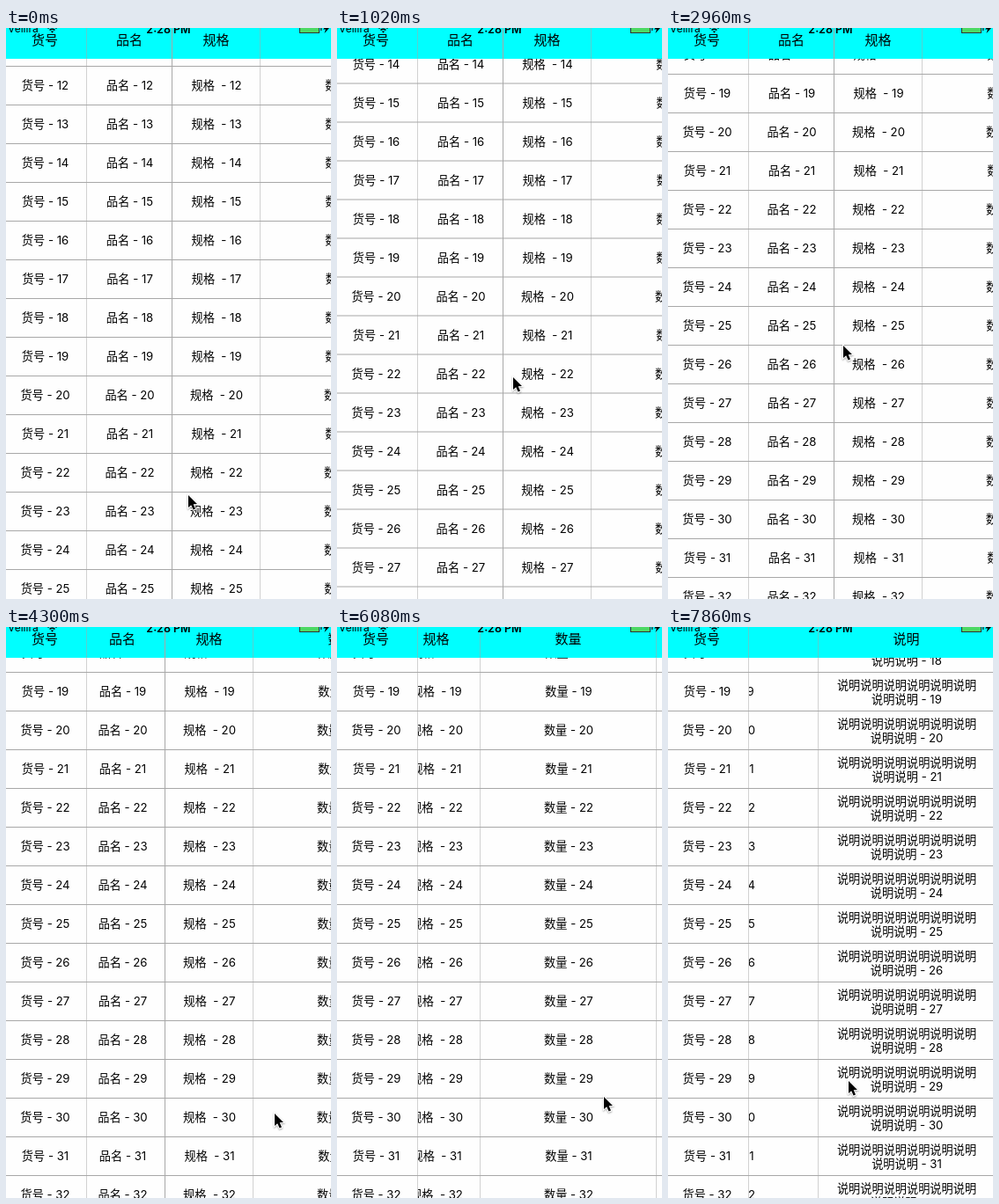
These frames come from a looping animation (369 by 649 pixels, 8 s). An HTML page with a canvas:

```html
<!DOCTYPE html>
<html lang="zh-CN">
<head>
<meta charset="utf-8">
<title>Scrolling table</title>
<style>
html, body { margin: 0; width: 100%; height: 100%; overflow: hidden; background: #fff; }
canvas { display: block; width: 369px; height: 649px; }
</style>
</head>
<body>
<canvas id="stage" width="369" height="649"></canvas>
<script>
const W = 369, H = 649, LOOP = 8000, TICK = 148.5, LAST = 53;
const HEAD = 35, ROW = 44, FROZEN = 92, FIRST = 11, END = 35;
const FONT = 'Inter, "Noto Sans CJK SC", "Noto Sans CJK", sans-serif';
const ctx = document.getElementById('stage').getContext('2d');

const columns = [
  { title: '货号', width: 95 },
  { title: '品名', width: 97, alpha: 1 },
  { title: '规格', width: 100, gap: '  ' },
  { title: '数量', width: 200 },
  { title: '说明', width: 200, long: true }
];
let left = -4;
for (const c of columns) {
  c.mid = left + c.width / 2 + 1;
  left = c.edge = left + c.width;
}
const [fixed, ...sliding] = columns;

const glide = p => p * p * (3 - 2 * p);
const settle = p => 1 - (1 - p) ** 4;

// Each move eases the pointer (x, y) and the scroll (sx, sy) to new values
const begin = { x: 207, y: 531, sx: 0, sy: 0 };
const moves = [
  { from: 0, to: 7, x: 200, y: 397, sy: 112.5 },
  { from: 7, to: 9, x: 199, y: 390, sy: 137.5, ease: settle },
  { from: 10, to: 13, y: 533 },
  { from: 15, to: 20, y: 361, sy: 299 },
  { from: 20, to: 22, y: 364, sy: 300, ease: settle },
  { from: 23, to: 26, x: 314, y: 554 },
  { from: 28, to: 34, x: 194, y: 543, sx: 111 },
  { from: 35, to: 37, x: 319, y: 535 },
  { from: 40, to: 45, x: 164, y: 522, sx: 256 },
  { from: 47, to: 49, x: 320 },
  { from: 50, to: 53, x: 205, y: 516, sx: 318 }
];

function stateAt(k) {
  const s = { ...begin };
  for (const { from, to, ease = glide, ...goal } of moves) {
    if (k <= from) break;
    const p = ease(Math.min(1, (k - from) / (to - from)));
    for (const key in goal) s[key] += (goal[key] - s[key]) * p;
  }
  return s;
}

function rect(x, y, w, h, color) {
  ctx.fillStyle = color;
  ctx.fillRect(x, y, w, h);
}

function text(str, x, y, size, align = 'center', weight = 400) {
  ctx.font = `${weight} ${size}px ${FONT}`;
  ctx.textAlign = align;
  ctx.fillStyle = '#000';
  ctx.fillText(str, x, y);
}

function clipped(x, y, w, h, paint) {
  ctx.save();
  ctx.beginPath();
  ctx.rect(x, y, w, h);
  ctx.clip();
  paint();
  ctx.restore();
}

function path(...points) {
  ctx.beginPath();
  points.forEach(([x, y]) => ctx.lineTo(x, y));
  ctx.closePath();
}

function edge(col, dx) {
  ctx.globalAlpha = col.alpha || 0.52;
  rect(col.edge - dx, 0, 1, H, '#a8a8a8');
  ctx.globalAlpha = 1;
}

const rowTop = (n, sy) => 43 + (n - 12) * ROW - sy;

function column(col, dx, sy) {
  const x = col.mid - dx;
  for (let n = FIRST; n < END; n++) {
    const y = rowTop(n, sy), tail = `${col.gap || ' '}- ${n}`;
    if (col.long) {
      text(col.title.repeat(6), x, y + 20, 13.2);
      text(col.title.repeat(2) + tail, x, y + 35.5, 13.2);
    } else {
      text(col.title + tail, x, y + 27, 13.2);
    }
  }
}

function statusBar() {
  text('Vellira', 2, 5, 12, 'left');
  text('2:28 PM', 184.5, 6, 12.5, 'center', 600);

  // Wi-Fi
  ctx.strokeStyle = '#000';
  ctx.lineWidth = 1.6;
  for (const r of [4.2, 7.2]) {
    ctx.beginPath();
    ctx.arc(52.5, 5.5, r, -Math.PI * 0.75, -Math.PI * 0.25);
    ctx.stroke();
  }
  path([50.8, 3.6], [54.2, 3.6], [52.5, 5.8]);
  ctx.fillStyle = '#000';
  ctx.fill();

  // Battery
  rect(333, -4, 23, 10, '#333');
  rect(334, -4, 21, 9, '#4cd964');
  rect(357, -1, 1.5, 4, '#333');
  path([365, -4], [360, 1.5], [363, 1.5], [361.5, 6], [367, 0], [364, 0]);
  ctx.fillStyle = '#000';
  ctx.fill();
}

function pointer(x, y) {
  ctx.save();
  ctx.translate(x, y);
  path([0, 0], [0, 14], [3.2, 11.2], [5.6, 16.6], [8, 15.6], [5.7, 10.3], [10, 10]);
  ctx.shadowColor = 'rgba(0,0,0,0.35)';
  ctx.shadowBlur = 2;
  ctx.shadowOffsetY = 1;
  ctx.strokeStyle = '#fff';
  ctx.lineWidth = 2;
  ctx.stroke();
  ctx.shadowColor = 'transparent';
  ctx.fillStyle = '#000';
  ctx.fill();
  ctx.restore();
}

function draw(ms) {
  // The picture advances in even ticks
  const s = stateAt(Math.min(LAST, Math.floor((ms + 20) / TICK)));
  const sx = Math.round(s.sx), sy = Math.round(s.sy * 2) / 2;

  rect(0, 0, W, H, '#fefefe');
  clipped(0, HEAD, W, H - HEAD, () => {
    for (let n = FIRST; n < END; n++) rect(0, rowTop(n, sy), W, 1, '#a8a8a8');
    column(fixed, 0, sy);
    clipped(FROZEN, HEAD, W - FROZEN, H - HEAD, () => sliding.forEach(c => column(c, sx, sy)));
  });

  rect(0, 0, W, HEAD, '#00ffff');
  text(fixed.title, fixed.mid - 0.5, 19, 15);
  edge(fixed, 0);
  clipped(FROZEN, 0, W - FROZEN, H, () => sliding.forEach(c => {
    text(c.title, c.mid - sx - 0.5, 19, 15);
    edge(c, sx);
  }));

  statusBar();
  pointer(Math.round(s.x), Math.round(s.y));
}

const start = performance.now();
function loop(now) {
  draw(Math.max(0, now - start) % LOOP);
  requestAnimationFrame(loop);
}
draw(0);
requestAnimationFrame(loop);
</script>
</body>
</html>
```
